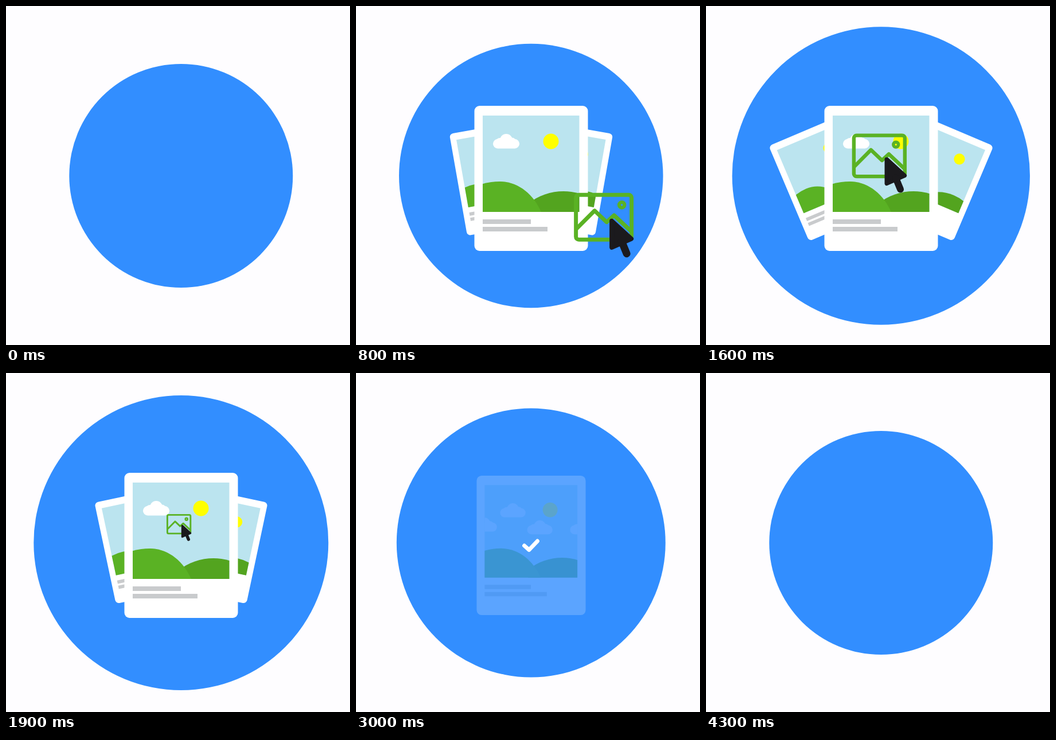
Recreate the animation shown at these times as an HTML page. Size 600 by 591 pixels, loop 4.6 s.

```html
<!DOCTYPE html>
<html lang="en">
<head>
<meta charset="utf-8">
<title>Photo upload</title>
<style>
  html, body { margin: 0; width: 100%; height: 100%; overflow: hidden; background: #fefdff; }
  svg { display: block; width: 100vw; height: 100vh; }
</style>
</head>
<body>
<svg viewBox="0 0 600 591">
  <defs>
    <clipPath id="photo"><rect x="221" y="191" width="168.5" height="168"/></clipPath>
    <g id="card">
      <rect x="206.5" y="174" width="198" height="253" rx="9" fill="#fff"/>
      <rect x="221" y="191" width="168.5" height="168" fill="#bbe4ef"/>
      <path d="M300 345C318 330 340 323 362 323Q376 323 389.5 327V359H300Z" fill="#53a41f"/>
      <path d="M221 310Q236 306 250 306C283 306 309 328 323 359H221Z" fill="#5ab224"/>
      <circle cx="340" cy="236" r="13.5" fill="#ff0"/>
      <path d="M221 376H305M221 389H334" stroke="#c9cbcd" stroke-width="8"/>
    </g>
    <g id="cloud" fill="#fff">
      <rect y="9" width="46" height="16.5" rx="8.2"/>
      <circle cx="23" cy="11" r="11"/>
      <circle cx="12" cy="14.5" r="7.5"/>
      <circle cx="33" cy="14" r="7.5"/>
    </g>
  </defs>

  <circle id="disc" cx="305.3" cy="296" r="195" fill="#328eff"/>
  <use id="left" href="#card"/>
  <use id="right" href="#card"/>
  <g id="main">
    <use href="#card"/>
    <g id="clouds" clip-path="url(#photo)">
      <use href="#cloud"/><use href="#cloud"/><use href="#cloud"/><use href="#cloud"/>
    </g>
  </g>
  <g id="drag">
    <g fill="none" stroke="#5ab224" stroke-width="7" stroke-linejoin="round">
      <rect x="3.5" y="3.5" width="97" height="78" rx="5"/>
      <path d="M4 63L36 31L57 51L70 39L100 67"/>
      <circle cx="83.5" cy="21" r="4.8" stroke-width="6"/>
    </g>
    <g fill="#1b1a1d" stroke="#1b1a1d" stroke-linejoin="round" stroke-linecap="round">
      <path d="M66 49L100 80L66 95Z" stroke-width="8"/>
      <path d="M83 84L92 106" stroke-width="13"/>
    </g>
  </g>
  <path id="check" d="M-11.5 .5L-3.2 8L11.5 -7.5" fill="none" stroke="#fff"
    stroke-width="7" stroke-linecap="round" stroke-linejoin="round"/>
</svg>
<script>
const LOOP = 4600, STEP = 100;
const $ = id => document.getElementById(id);
const clouds = $("clouds").children;

const ramp = (t, a, b) => Math.min(1, Math.max(0, (t - a) / (b - a)));
const smooth = (t, a, b) => { const p = ramp(t, a, b); return p * p * (3 - 2 * p); };
const mix = (a, b, p) => a + (b - a) * p;

// [time, radius] of the pulsing disc
const pulse = [[600, 195], [1020, 271], [1380, 236], [1735, 271], [1900, 257],
  [2200, 247], [2400, 244], [2700, 241], [3000, 234.5], [3200, 213], [3400, 195]];
// Cloud start x, start y and later y
const drift = [[239, 223, 223, 255], [161, 247, 247, 255], [112, 224, 224, 224], [60, 250, 250, 250]];

function radius(t) {
  let r = pulse[0][1];
  for (let i = 1; i < pulse.length; i++) {
    const [a, from] = pulse[i - 1], [b, to] = pulse[i];
    if (t >= a) r = mix(from, to, b <= 1735 ? smooth(t, a, b) : ramp(t, a, b));
  }
  return r;
}

function show(el, opacity, transform) {
  el.style.display = opacity > 0 ? "" : "none";
  el.setAttribute("opacity", opacity);
  el.setAttribute("transform", transform);
}

function placeSide(el, side, spread) {
  const angle = 24 * spread, x = 305.5 + side * (28 + 2.96 * angle);
  show(el, spread > 0 ? 1 : 0,
    `translate(${x} 299.5) rotate(${side * angle}) scale(.712) translate(-305.5 -300.5)`);
}

function draw(t) {
  $("disc").setAttribute("r", radius(t));

  const spread = smooth(t, 600, 1050) * (1 - smooth(t, 1500, 2300));
  placeSide($("left"), -1, spread);
  placeSide($("right"), 1, spread);

  const enter = ramp(t, 0, 400), leave = ramp(t, 2700, 3075);
  const size = mix(.95, 1, enter) - .05 * leave;
  show($("main"), enter * (1 - leave),
    `translate(305.5 300.8) scale(${size}) translate(-305.5 -300.8)`);

  const shift = Math.max(0, t - 1960) * .132;
  drift.forEach(([x, y0, y1, y2], i) => {
    const y = mix(mix(y0, y1, ramp(t, 1960, 2400)), y2, ramp(t, 2400, 3000));
    clouds[i].setAttribute("transform", `translate(${x + shift} ${y})`);
  });

  const move = smooth(t, 500, 1150), drop = 1 - ramp(t, 1550, 2150);
  const x = mix(483, 250.5, move), y = mix(411, 218.5, move);
  show($("drag"), drop > 0 ? ramp(t, 200, 500) : 0,
    `translate(${mix(301, x, drop)} ${mix(265.5, y, drop)}) scale(${drop})`);

  const tick = ramp(t, 2880, 3400) * (1 - ramp(t, 3600, 4000));
  show($("check"), tick > 0 ? 1 : 0, `translate(305 300.5) scale(${4.3 * tick})`);
}

function tickFrame() {
  const t = performance.now() % LOOP;
  draw(Math.floor(t / STEP) * STEP);
  requestAnimationFrame(tickFrame);
}
tickFrame();
</script>
</body>
</html>
```
